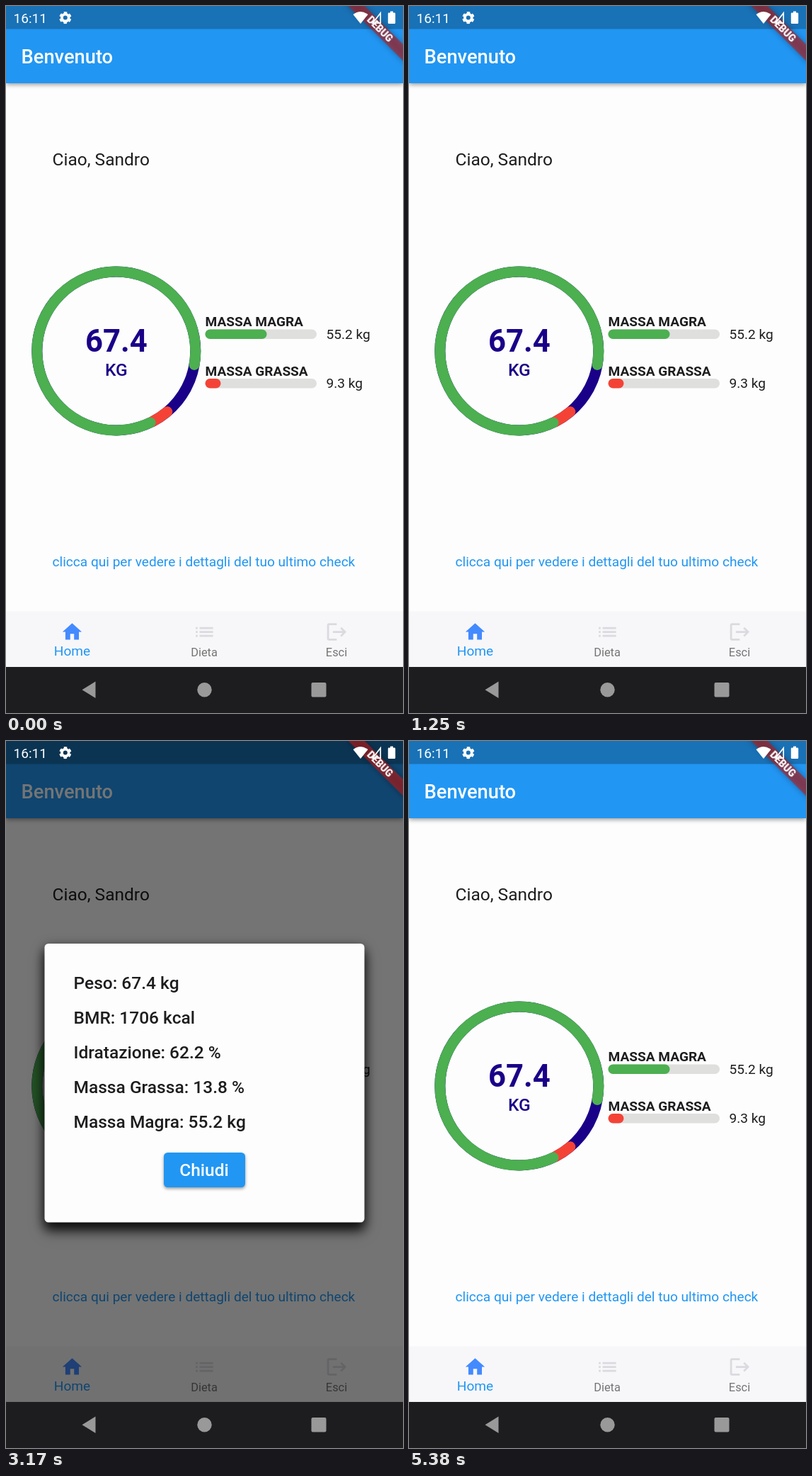
Write an HTML page that moves like this. It is 561 px wide and 998 px high and loops after 5.42 s.

```html
<!DOCTYPE html>
<html lang="it">
<head>
<meta charset="utf-8">
<title>Benvenuto</title>
<style>
  html, body { margin: 0; width: 100%; height: 100%; overflow: hidden; background: #000; }
  svg { display: block; width: 100%; height: 100%; font-family: Roboto, sans-serif; font-size: 19.1px; fill: #1d1d1f; }
  .title { font-size: 27.3px; font-weight: 500; fill: #fff; }
  .large { font-size: 24.5px; }
  .medium { font-weight: 500; }
  .bold { font-weight: 700; }
  .small { font-size: 16.4px; fill: #757575; }
  .mid { text-anchor: middle; }
  .navy { fill: #1a0088; }
  .blue { fill: #2196f3; }
  .green { fill: #4caf50; }
  .red { fill: #f44336; }
  .track { fill: #dfdfde; }
  .pale { fill: #dadadf; }
  .white { fill: #fff; }
  .ring { fill: none; stroke-width: 15; stroke-linecap: round; }

  .appbar { filter: drop-shadow(0 2px 3px rgba(0, 0, 0, .4)); }
  .paper { fill: #fdfdfd; filter: drop-shadow(0 10px 8px rgba(0, 0, 0, .85)) drop-shadow(0 3px 8px rgba(0, 0, 0, .35)); }
  .button { filter: drop-shadow(0 2px 2px rgba(0, 0, 0, .4)); }
  .banner { filter: drop-shadow(0 0 4px rgba(0, 0, 0, .5)); }

  .barrier, .dialog, .ripple { opacity: 0; animation: 5420ms linear infinite; }
  .barrier { animation-name: dim; }
  .dialog { animation-name: show; }
  .ripple { animation-name: glow, spread; transform-box: fill-box; transform-origin: center; }

  /* Opens at 2604 ms and closes at 4724 ms, 150 ms each; closing mirrors the opening curve. */
  @keyframes dim {
    0% { opacity: 0; }
    48.044% { opacity: 0; animation-timing-function: cubic-bezier(.25, .1, .25, 1); }
    50.812% { opacity: .54; }
    87.159% { opacity: .54; animation-timing-function: cubic-bezier(.75, 0, .75, .9); }
    89.926%, 100% { opacity: 0; }
  }
  @keyframes show {
    0% { opacity: 0; }
    48.044% { opacity: 0; animation-timing-function: ease-out; }
    50.812% { opacity: 1; }
    87.159% { opacity: 1; animation-timing-function: ease-in; }
    89.926%, 100% { opacity: 0; }
  }
  @keyframes glow {
    0%, 85.609% { opacity: 0; }
    86.993%, 91.31% { opacity: .22; }
    91.32%, 100% { opacity: 0; }
  }
  @keyframes spread {
    0%, 85.609% { transform: scale(.3); }
    87.159% { transform: scale(.42); animation-timing-function: ease; }
    91.31%, 100% { transform: scale(1); }
  }
</style>
</head>
<body>
<svg viewBox="0 0 561 998" preserveAspectRatio="none">
  <defs>
    <clipPath id="buttonClip"><rect x="223" y="581" width="115" height="49" rx="5.5"/></clipPath>
  </defs>

  <rect width="561" height="933" fill="#fdfdfd"/>
  <rect class="blue appbar" y="-20" width="561" height="129"/>
  <rect width="561" height="32.5" fill="#000" opacity=".25"/>
  <text class="title" x="21.5" y="81">Benvenuto</text>
  <text class="large" x="65.5" y="224.5">Ciao, Sandro</text>

  <!-- Weight ring: angles run clockwise from the right -->
  <g class="ring" transform="translate(155.8 487)">
    <circle r="112" stroke="#1a0088"/>
    <path id="fatArc" stroke="#f44336"/>
    <path id="leanArc" stroke="#4caf50"/>
  </g>
  <text class="navy bold mid" x="155.8" y="488" font-size="43.6">67.4</text>
  <text class="navy large medium mid" x="155.8" y="522">KG</text>

  <text class="bold" x="281.5" y="452">MASSA MAGRA</text>
  <rect class="track" x="281.5" y="456.5" width="157.5" height="13.6" rx="6.8"/>
  <rect class="green" x="281.5" y="456.5" width="87" height="13.6" rx="6.8"/>
  <text x="452.5" y="469.5">55.2 kg</text>

  <text class="bold" x="281.5" y="522">MASSA GRASSA</text>
  <rect class="track" x="281.5" y="526" width="157.5" height="13.6" rx="6.8"/>
  <rect class="red" x="281.5" y="526" width="22" height="13.6" rx="6.8"/>
  <text x="452.5" y="539">9.3 kg</text>

  <text class="blue" x="65.5" y="791">clicca qui per vedere i dettagli del tuo ultimo check</text>

  <!-- Bottom tabs -->
  <rect y="854.5" width="561" height="79" fill="#f7f7fa"/>
  <path fill="#448aff" transform="translate(77.1 867.2) scale(1.364)" d="M10 20v-6h4v6h5v-8h3L12 3 2 12h3v8z"/>
  <path class="pale" transform="translate(264 867.2) scale(1.364)" d="M3 11h2v2H3zM3 15h2v2H3zM3 7h2v2H3zM7 11h14v2H7zM7 15h14v2H7zM7 7h14v2H7z"/>
  <path class="pale" transform="translate(451 867.2) scale(1.364)" d="M17 7l-1.4 1.4L18.2 11H8v2h10.2l-2.6 2.6L17 17l5-5zM4 5h8V3H4a2 2 0 0 0-2 2v14a2 2 0 0 0 2 2h8v-2H4z"/>
  <text class="blue mid" x="93.5" y="917">Home</text>
  <text class="small mid" x="280" y="918">Dieta</text>
  <text class="small mid" x="467" y="918">Esci</text>

  <rect class="barrier" width="561" height="933" fill="#000"/>

  <g class="dialog">
    <rect class="paper" x="54.5" y="286" width="452" height="393.5" rx="5.5"/>
    <g class="large medium">
      <text x="95.5" y="350">Peso: 67.4 kg</text>
      <text x="95.5" y="399">BMR: 1706 kcal</text>
      <text x="95.5" y="448">Idratazione: 62.2 %</text>
      <text x="95.5" y="497">Massa Grassa: 13.8 %</text>
      <text x="95.5" y="546">Massa Magra: 55.2 kg</text>
    </g>
    <rect class="blue button" x="223" y="581" width="115" height="49" rx="5.5"/>
    <g clip-path="url(#buttonClip)"><circle class="ripple white" cx="283.5" cy="606" r="66"/></g>
    <text class="large medium mid white" x="280" y="614">Chiudi</text>
  </g>

  <g transform="translate(561 0) rotate(45)">
    <rect class="banner" x="-60" y="38.2" width="120" height="16.4" fill="#b71c1c" fill-opacity=".63"/>
    <text class="mid white" y="51.3" font-size="13.9" font-weight="900">DEBUG</text>
  </g>

  <!-- System bars -->
  <text class="white" x="10.5" y="24">16:11</text>
  <g transform="translate(83.8 16.6)" fill="none" stroke="#fff">
    <circle r="4.9" stroke-width="3.8"/>
    <circle r="7" stroke-width="3.2" stroke-dasharray="4.2 3.13" stroke-dashoffset="-1.565"/>
  </g>
  <path class="white" d="M501 25L490.5 12Q501 4 511.5 12z"/>
  <path d="M518 24.2L529.2 10V24.2z" fill="none" stroke="#fff" stroke-width="1.7"/>
  <path class="white" d="M543 7.5h4v2h2a1.2 1.2 0 0 1 1.2 1.2v13a1.2 1.2 0 0 1-1.2 1.2h-8a1.2 1.2 0 0 1-1.2-1.2v-13a1.2 1.2 0 0 1 1.2-1.2h2z"/>
  <rect y="933" width="561" height="65"/>
  <g fill="#999">
    <path d="M107.5 965.2L126.5 953.5V977z"/>
    <circle cx="280.5" cy="965.3" r="10.2"/>
    <rect x="431.5" y="955" width="21" height="20.6" rx="2"/>
  </g>
</svg>
<script>
  const point = deg => {
    const a = deg * Math.PI / 180;
    return `${112 * Math.cos(a)} ${112 * Math.sin(a)}`;
  };
  const arc = (id, from, to) => document.getElementById(id)
    .setAttribute('d', `M${point(from)}A112 112 0 ${+(to - from > 180)} 1 ${point(to)}`);

  arc('fatArc', 50, 63);
  arc('leanArc', 64.5, 370);
</script>
</body>
</html>
```
